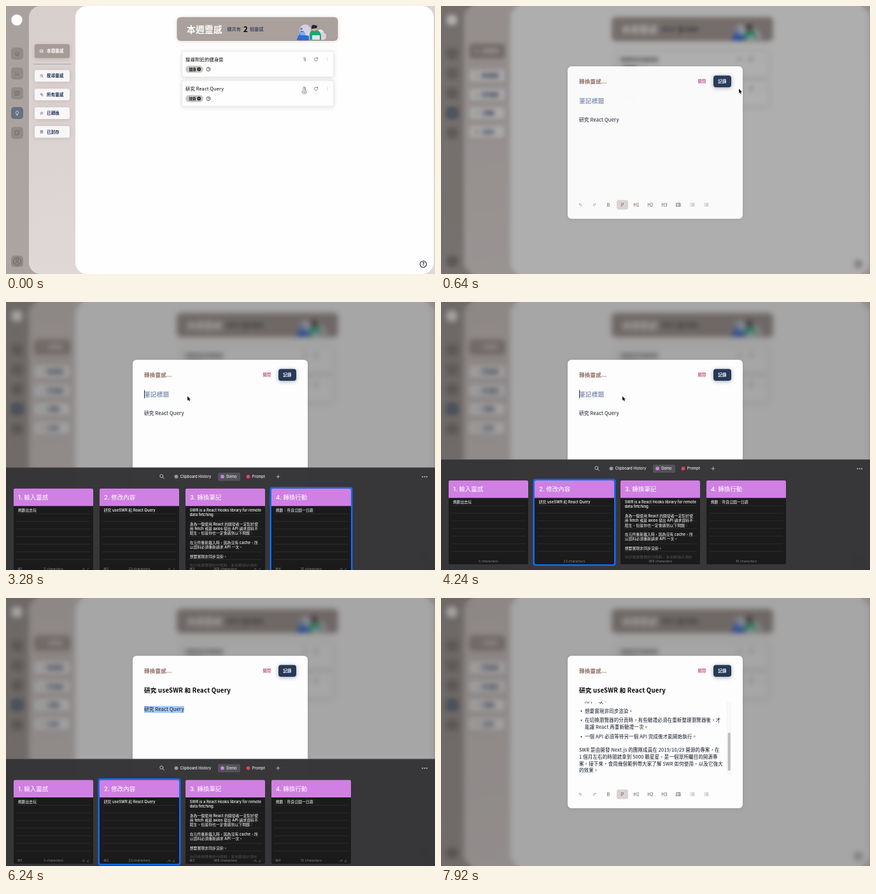
An HTML page with a canvas for the animation above (8000 ms loop, 674 px wide and 422 px high).

```html
<!DOCTYPE html>
<html lang="zh-Hant">
<head>
<meta charset="utf-8">
<title>本週靈感</title>
<style>
html, body { margin: 0; width: 100%; height: 100%; overflow: hidden; background: #fff; }
canvas { display: block; width: 674px; height: 422px; }
</style>
</head>
<body>
<canvas id="stage"></canvas>
<script>
const W = 674, H = 422, LOOP = 8000;
const dpr = window.devicePixelRatio || 1;
const CJK = '"Noto Sans CJK TC", "Noto Sans CJK JP", "Noto Sans CJK", sans-serif';
const UI = 'Inter, "Noto Sans CJK TC", "Noto Sans CJK JP", sans-serif';
const NAVY = '#263957', TAUPE = '#aaa09c', INK = '#0c1122';

function layer(el) {
  el.width = W * dpr;
  el.height = H * dpr;
  const c = el.getContext('2d');
  c.scale(dpr, dpr);
  return c;
}
const view = layer(document.getElementById('stage'));
const pageCanvas = document.createElement('canvas');
const softCanvas = document.createElement('canvas');
const page = layer(pageCanvas), soft = layer(softCanvas);
let g = page;

const clamp = v => Math.max(0, Math.min(1, v));
const easeOut = p => 1 - (1 - p) ** 2;
const easeInOut = p => p < .5 ? 2 * p * p : 1 - 2 * (1 - p) ** 2;
const span = (t, start, dur) => clamp((t - start) / dur);

function box(x, y, w, h, r, fill, shadow) {
  g.save();
  if (shadow) {
    g.shadowColor = shadow;
    g.shadowBlur = 6 * dpr;
    g.shadowOffsetY = dpr;
  }
  g.fillStyle = fill;
  g.beginPath();
  g.roundRect(x, y, w, h, r);
  g.fill();
  g.restore();
}
function dot(x, y, r, fill) {
  g.fillStyle = fill;
  g.beginPath();
  g.arc(x, y, r, 0, 7);
  g.fill();
}
// Strokes an SVG path whose origin is moved to x, y.
function icon(x, y, d, color, width = .8) {
  g.save();
  g.translate(x, y);
  g.strokeStyle = color;
  g.lineWidth = width;
  g.lineCap = g.lineJoin = 'round';
  g.stroke(new Path2D(d));
  g.restore();
}
function shape(x, y, d, fill) {
  g.save();
  g.translate(x, y);
  g.fillStyle = fill;
  g.fill(new Path2D(d));
  g.restore();
}
function text(s, x, y, size, color, { weight = 400, font = CJK, align = 'left', track = .025 } = {}) {
  g.font = `${weight} ${size}px ${font}`;
  g.letterSpacing = size * track + 'px';
  g.textAlign = align;
  g.textBaseline = 'alphabetic';
  g.fillStyle = color;
  g.fillText(s, x, y + size * .36);
}
const ui = (s, x, y, size, color, opt) => text(s, x, y, size, color, { font: UI, track: 0, ...opt });

const GLYPH = {
  home: 'M-3 0L0-3L3 0M-2-1V3H2V-1M0 3V1',
  list: 'M-3 2H3M-3-2H-2',
  note: 'M-3-3H3V3H-3ZM-1-1H1M-1 1H1',
  bulb: 'M-1 1.5C-3 0-2.5-3 0-3C2.5-3 3 0 1 1.5ZM-1 3H1',
  sticky: 'M-3-3H3V1L1 3H-3ZM1 3V1H3',
  check: 'M-2-2H2V2H-2ZM-1 0L0 1L1-1',
  search: 'M1.2-.5A1.7 1.7 0 1 1-2.2-.5A1.7 1.7 0 1 1 1.2-.5M.8 .8L2.3 2.3',
  all: 'M-2 0H2M0-2V2M-2-2H-1M1 2H2',
  swap: 'M-2-1H2L1-2M2 1H-2L-1 2',
  archive: 'M-2-2H2M-1.6-1V2H1.6V-1ZM-.6 .2H.6',
  clip: 'M-1.5-2.5H.5Q1.5-2.5 1.5-1.5V2.5M-.4-1V2',
  again: 'M2.4-1.3A2.7 2.7 0 1 0 2.7 .6M2.6-2.8V-1.2H1',
  undo: 'M-1-2L-2-1L-1 0M-2-1H.8Q2 0 1 2H0',
  redo: 'M1-2L2-1L1 0M2-1H-.8Q-2 0-1 2H0',
  image: 'M-3-2.5H3V2.5H-3ZM-3 1.5L-1-.7L1 1.5L2 .5L3 1.5M1.2-2.5V.3',
  lines: 'M-1-2H3M-1 0H3M-1 2H3M-3-2H-2.6M-3 0H-2.6M-3 2H-2.6',
  plus: 'M-2.6 0H2.6M0-2.6V2.6'
};

function drawIllustration() {
  dot(470, 38, 9, '#d3d0df');
  dot(494, 42, 5, '#e4e1ea');
  box(460, 42, 43, 11.5, 5, '#d6d2df');
  shape(457, 54, 'M0 0Q1-6 4-9L6-15L11-14L13-8L19-7V0Z', '#3667dc');
  box(462, 41, 8, 5, 1, '#7fb0f5');
  dot(464, 36, 1.8, '#5d74c8');
  shape(477, 53.5, 'M0 0V-9Q1-15 6-15H11Q16-15 18-8V0Z', '#1ba673');
  dot(484.5, 36, 3.4, '#e2a48f');
  shape(484, 34, 'M-4 2V-2Q-3-5 1-4L5-3L4 1Z', '#26233c');
  box(481, 46, 12, 7, 1, '#d9e6ea');
  box(496, 44, 3.5, 9, 1, '#f3c7cf');
}

function drawIdea(y, title, tag) {
  box(276, y, 239, 41, 4, '#fefefe', 'rgba(60,50,50,.18)');
  g.strokeStyle = '#e2dfde';
  g.lineWidth = .6;
  g.strokeRect(276.5, y + .5, 238, 40);
  text(title, 282, y + 13.5, 7.3, '#000', { weight: 500 });
  box(282, y + 23, 28, 11, 5.5, '#c9c5c4');
  text(tag, 287.5, y + 28.6, 5.6, '#111', { weight: 700, track: 0 });
  dot(303.2, y + 28.5, 3, '#222');
  icon(303.2, y + 28.5, 'M-1-1L1 1M-1 1L1-1', '#ddd', .6);
  icon(318, y + 28.5, 'M3 0A3 3 0 1 1-3 0A3 3 0 1 1 3 0M0-1.6V.2H1', '#333');
  icon(469, y + 13, GLYPH.clip, '#666');
  icon(487, y + 13, GLYPH.again, '#666');
  for (const d of [-2, 0, 2]) dot(505, y + 13 + d, .45, '#777');
}

function drawPage() {
  g = page;
  const rail = g.createLinearGradient(0, 0, 0, 422);
  rail.addColorStop(0, '#a8a19d');
  rail.addColorStop(1, '#ada5a1');
  g.fillStyle = rail;
  g.fillRect(0, 0, W, H);
  const side = g.createLinearGradient(36, 0, 109, 422);
  side.addColorStop(0, '#d8cfcd');
  side.addColorStop(1, '#dfd8d6');
  box(36, 0, 660, 422, 18, side);
  g.fillStyle = side;
  g.fillRect(600, 0, 74, 422);
  box(109, 0, 563, 422, 18, '#fefefe');

  dot(17, 22, 8.7, '#fff');
  ['home', 'list', 'note', 'bulb', 'sticky'].forEach((name, i) => {
    const y = 75 + i * 31.2, on = name === 'bulb';
    box(8, y - 9.5, 19, 19, 5, on ? '#667083' : '#918a87');
    icon(17.5, y, GLYPH[name], on ? '#eee' : '#6c6664');
  });
  box(8, 393, 19, 18, 5, '#918a87');
  icon(17.5, 402, 'M6 0A6 6 0 1 1-6 0A6 6 0 1 1 6 0M2-1.5A2 2 0 1 1-2-1.5A2 2 0 1 1 2-1.5M-4 4Q0-.5 4 4', '#5f5a59');

  box(45, 60, 55, 22, 3, '#a69b97', 'rgba(70,50,50,.2)');
  icon(56, 71, GLYPH.check, '#fff', .7);
  text('本週靈感', 64, 71, 6.5, '#fff', { weight: 700 });
  icon(0, 0, 'M43 91.5H102', '#a89e9a');
  [['搜尋靈感', 'search'], ['所有靈感', 'all'], ['已轉換', 'swap'], ['已封存', 'archive']].forEach(([label, name], i) => {
    const y = 110 + i * 29.4;
    box(45, y - 9.2, 55, 18.4, 3, '#f8f6f6', 'rgba(70,50,50,.16)');
    icon(56, y, GLYPH[name], '#56607a', .7);
    text(label, 64, y, 6.5, '#1c2c56', { weight: 700 });
  });

  box(268.5, 17.5, 253, 37.5, 6, TAUPE, 'rgba(70,50,50,.14)');
  text('本週靈感', 284, 36.8, 13.7, '#fff', { weight: 700 });
  text('總共有', 347.5, 36.8, 7.1, '#182848', { weight: 500 });
  text('2', 373, 36.8, 11.5, '#000', { weight: 700 });
  text('個靈感', 383, 36.8, 7.1, '#182848', { weight: 500 });
  drawIllustration();
  icon(0, 0, 'M268 63H522', '#f1efef', .6);
  drawIdea(71, '搜尋附近的健身房', '健康');
  drawIdea(117.3, '研究 React Query', '技術');
  icon(655.5, 406.5, 'M5 0A5 5 0 1 1-5 0A5 5 0 1 1 5 0', '#1c2130', 1.1);
  text('?', 655.5, 406.5, 8, '#1c2130', { weight: 700, align: 'center', track: 0 });
}

function blurPage(ctx, radius) {
  ctx.save();
  ctx.drawImage(pageCanvas, 0, 0, W, H);
  ctx.filter = `blur(${radius * dpr}px)`;
  ctx.drawImage(pageCanvas, 0, 0, W, H);
  ctx.restore();
}

const NOTE = [
  [163, 226, 'API 一次。'],
  [178, 226, '想要實現非同步渲染。', 1],
  [192.5, 226, '在切換瀏覽器的分頁時，有些驗證必須在重新整理瀏覽器後，才', 1],
  [203.5, 226, '能讓 React 再重新驗證一次。'],
  [218.5, 226, '一個 API 必須等待另一個 API 完成後才能開始執行。', 1],
  [239, 217, 'SWR 是由開發 Next.js 的團隊成員在 2019/10/29 開源的專案，在'],
  [250, 217, '1 個月左右的時間就拿到 5000 顆星星，是一個眾所矚目的開源專'],
  [261, 217, '案。接下來，會用幾個範例帶大家了解 SWR 如何使用，以及它強大'],
  [271.5, 217, '的效果。']
];

function drawNote() {
  g.save();
  g.beginPath();
  g.rect(199, 163.5, 275, 116);
  g.clip();
  for (const [y, x, line, bullet] of NOTE) {
    if (bullet) dot(220.5, y, 1, INK);
    text(line, x, y, 7.45, INK, { weight: 500 });
  }
  box(449, 164, 6.5, 115, 0, '#f9f9f9');
  icon(0, 0, 'M449.3 164V279M455.5 164V279', '#ebebeb', .5);
  box(450.7, 212, 4, 60, 2, '#bcbcbc');
  g.restore();
}

function drawModal(t) {
  const p = span(t, 360, 400);
  if (!p) return;
  const e = easeOut(p);
  g.save();
  g.globalAlpha = 1 - (1 - e) ** 1.5;
  g.translate(0, 45 * (1 - e));
  box(199, 91, 275, 240, 6, '#fdfdfd', 'rgba(0,0,0,.08)');
  text('轉換靈感...', 217, 115, 8.5, '#8f6c64', { weight: 700 });
  text('關閉', 403.5, 115, 6.3, '#ac125a', { weight: 500 });
  box(428, 105.5, 28, 18.5, 4, NAVY, 'rgba(20,35,70,.4)');
  text('記錄', 442, 115, 6.5, '#fff', { weight: 700, align: 'center' });

  const titled = t >= 4960, filled = t >= 7440;
  const title = titled ? '研究 useSWR 和 React Query' : '筆記標題';
  text(title, 217, 145.3, 9.6, titled ? '#000' : '#8796b4', { weight: 700 });
  const blinkOn = t >= 2000 && (t - 2000) % 1000 < 500;
  if (!titled && blinkOn) box(217, 138.5, .9, 13, 0, '#222');
  if (titled && t < 5300) box(351.5, 138.5, .9, 13, 0, '#222');

  if (filled) drawNote();
  else {
    if (t >= 5300) box(217, 170, 63, 11, 0, '#a5cdf9');
    text('研究 React Query', 217, 175.7, 7.6, INK, { weight: 500 });
  }

  box(276, 301.5, 18, 15, 3, '#dad2d0');
  icon(219, 309, GLYPH.undo, '#888', .7);
  icon(241, 309, GLYPH.redo, '#888', .7);
  ['B', 'P', 'H1', 'H2', 'H3'].forEach((s, i) =>
    text(s, 263 + i * 22, 309.2, 7.2, '#555', { weight: 500, align: 'center' }));
  icon(373, 309, GLYPH.image, '#555', .7);
  icon(395, 309, GLYPH.lines, '#888', .7);
  icon(417, 309, GLYPH.lines, '#888', .7);
  g.restore();
}

const CLIPS = [
  ['1. 輸入靈感', 5, ['規劃出去玩']],
  ['2. 修改內容', 23, ['研究 useSWR 和 React Query']],
  ['3. 轉換筆記', 368, [
    'SWR is a React Hooks library for remote', 'data fetching.', '',
    '身為一個使用 React 的開發者一定對於使', '用 fetch 或是 axios 發出 API 請求資料不', '陌生，但是你也一定會遇到以下問題：', '',
    '在元件重新載入時，因為沒有 cache，所', '以資料必須重新請求 API 一次。', '',
    '想要實現非同步渲染。', '', '在切換瀏覽器的分頁時，有些驗證必須在']],
  ['4. 轉換行動', 10, ['規劃：奈良公園一日遊']]
];

function drawClip([title, count, lines], i, selected, hints) {
  const x = 12 + i * 135;
  if (selected) box(x - 2.5, 30.5, 130, 137, 4, '#0f6cf2');
  box(x, 33, 125, 132, 2, '#1b1b1c');
  box(x, 33, 125, 27.5, [2, 2, 0, 0], '#cf80e2');
  ui(title, x + 7, 46.8, 9.5, '#fff', { weight: 500 });
  for (let k = 0; k < 7; k++) icon(x, 72.7 + k * 12, 'M5 0H120', '#38383a', .6);
  lines.forEach((s, k) =>
    ui(s, x + 6.7, 67 + k * 7.28, 5.9, k > 11 ? '#555' : '#fff', { weight: 500 }));
  box(x + 1, 156, 123, 8.5, 0, 'rgba(27,27,28,.88)');
  ui(`${count} characters`, x + 62.5, 159.8, 5.2, '#858588', { align: 'center' });
  if (hints) {
    ui('⌘' + (i + 1), x + 6, 159.8, 5.2, '#858588');
    icon(x + 109, 159.8, 'M-2 2L1-1.5L2 2M6 1.5L9-1.5M7 2H9', '#858588', .6);
  }
}

function panelTop(t) {
  const [up, down] = t < 5500 ? [2960, 4520] : [5880, 6860];
  const shown = easeOut(span(t, up, 440)) - easeOut(span(t, down, 320));
  return H - 174 * shown;
}

function drawPanel(t) {
  const top = panelTop(t);
  if (top >= H) return;
  const pick = t < 3640 ? 3 : t < 3860 ? 2 : t < 6480 ? 1 : 2;
  const hints = t < 3440 || (t > 5800 && t < 6300);
  g.save();
  g.translate(0, top);
  box(0, 0, W, 180, 0, 'rgba(53,52,55,.985)');
  icon(0, 0, 'M0 .3H674', '#4c4b4e', .6);
  icon(245, 14, 'M1.8-.7A2.5 2.5 0 1 1-3.2-.7A2.5 2.5 0 1 1 1.8-.7M1.3 1.2L3.5 3.5', '#d0d0d2', .9);
  box(333, 8, 35, 13, 2, '#535256');
  const tabs = [['Clipboard History', 267.5, '#98989c'], ['Demo', 340, '#cf80e2'], ['Prompt', 380.5, '#e1445c']];
  for (const [label, x, color] of tabs) {
    dot(x, 14.2, 2.9, color);
    ui(label, x + 6.3, 14.3, 5.8, '#ededee', { weight: 500 });
  }
  icon(427.5, 14.3, GLYPH.plus, '#c8c8ca', .8);
  for (const d of [-3.4, 0, 3.4]) dot(657.8 + d, 14.5, 1.05, '#c8c8ca');
  CLIPS.forEach((clip, i) => drawClip(clip, i, i === pick, hints));
  g.restore();
}

function drawCursor(t) {
  if (t >= 4960) return;
  const m = easeInOut(span(t, 1050, 850));
  const x = 468 - 183 * m, y = 130.3 + 18 * m;
  const hand = t < 400;
  const d = hand
    ? 'M-.8 4.5V-1Q0-2 .8-1V2L3 2.7Q3.8 3 3.5 4.5L2.8 7.5H-1L-3 4.8Q-2.8 3.5-1.7 4Z'
    : 'M0 0V7L1.6 5.5L2.7 8L3.9 7.4L2.8 5.1H5Z';
  icon(x, y, d, hand ? '#222' : '#fff', 1);
  shape(x, y, d, hand ? '#fff' : '#111');
  if (hand) icon(x, y, 'M0 4V6M1.5 4V6', '#222', .5);
}

function render(t) {
  g = view;
  const e = easeOut(span(t, 360, 400));
  if (e >= 1) g.drawImage(softCanvas, 0, 0, W, H);
  else if (e > 0) blurPage(g, 4 * e);
  else g.drawImage(pageCanvas, 0, 0, W, H);
  g.fillStyle = `rgba(0,0,0,${.35 * e})`;
  g.fillRect(0, 0, W, H);
  drawModal(t);
  drawPanel(t);
  drawCursor(t);
}

drawPage();
blurPage(soft, 4);
const began = performance.now();
function tick() {
  render((performance.now() - began) % LOOP);
  requestAnimationFrame(tick);
}
tick();
</script>
</body>
</html>
```
